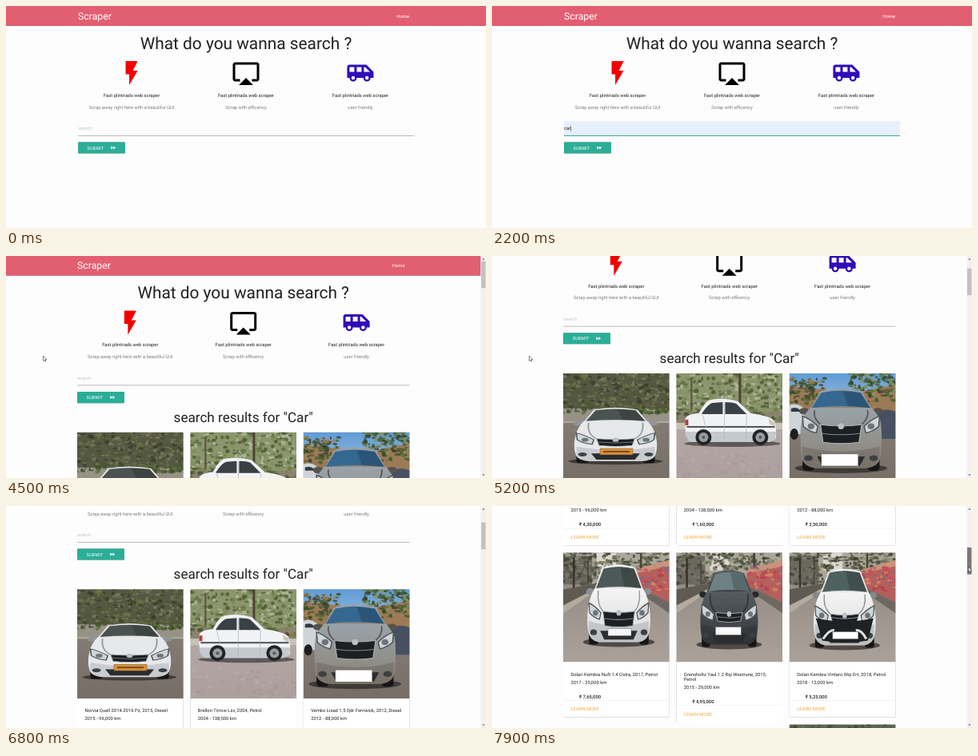
Recreate the animation shown at these times as an HTML page. Size 600 by 278 pixels, loop 8 s.

```html
<!DOCTYPE html>
<html lang="en">
<head>
<meta charset="utf-8">
<title>Scraper</title>
<style>
html, body { margin: 0; width: 100%; height: 100%; overflow: hidden; background: #fdfdfd; }
svg { display: block; }
text { font: 400 5.86px Roboto, sans-serif; fill: #212121; text-rendering: geometricPrecision; white-space: pre; }
.mid { text-anchor: middle; }
.light { font-weight: 300; fill: #444; }
.bold { font-weight: 500; }
.hint { fill: #c9c9c9; }
.white { fill: #fff; }
.link { fill: #f5a94a; }
.lift { filter: drop-shadow(0 .6px .6px rgba(0,0,0,.45)); }
</style>
</head>
<body>
<svg id="stage" width="600" height="278" viewBox="0 0 600 278"></svg>
<script>
const LOOP = 8000;
const $ = id => document.getElementById(id);

// markup helpers
const rect = (x, y, w, h, fill, more = '') => `<rect x="${x}" y="${y}" width="${w}" height="${h}" fill="${fill}" ${more}/>`;
const path = (d, fill, more = '') => `<path d="${d}" fill="${fill}" ${more}/>`;
const oval = (x, y, rx, ry, fill, more = '') => `<ellipse cx="${x}" cy="${y}" rx="${rx}" ry="${ry}" fill="${fill}" ${more}/>`;
const text = (x, y, s, cls = '', size = 5.86) => `<text x="${x}" y="${y}" class="${cls}" style="font-size:${size}px">${s}</text>`;
const place = (x, y, sx, sy, body) => `<g transform="translate(${x} ${y}) scale(${sx} ${sy})">${body}</g>`;
const fade = (id, a, b) => `<linearGradient id="${id}" x2="0" y2="1"><stop stop-color="${a}"/><stop offset="1" stop-color="${b}"/></linearGradient>`;

const icons = {
  bolt: 'M7 2v11h3v9l7-12h-4l4-8z',
  cast: 'M6 22h12l-6-6zM21 3H3c-1.1 0-2 .9-2 2v12c0 1.1.9 2 2 2h4v-2H3V5h18v12h-4v2h4c1.1 0 2-.9 2-2V5c0-1.1-.9-2-2-2z',
  van: 'M17 5H3c-1.1 0-2 .89-2 2v9h2a3 3 0 0 0 6 0h5.5a3 3 0 0 0 6 0H23v-5l-6-6zM3 11V7h4v4H3zM6 17.5a1.5 1.5 0 1 1 0-3 1.5 1.5 0 0 1 0 3zM13 11H9V7h4v4zM17.5 17.5a1.5 1.5 0 1 1 0-3 1.5 1.5 0 0 1 0 3zM15 11V7h1l4 4h-5z',
  next: 'M4 18l8.5-6L4 6v12zm9-12v12l8.5-6L13 6z'
};

// photo parts
function leaves(n, x, y, w, h, colors, seed) {
  let out = '';
  const rnd = () => (seed = seed * 16807 % 2147483647) / 2147483647;
  for (let i = 0; i < n; i++)
    out += oval((x + rnd() * w).toFixed(1), (y + rnd() * h).toFixed(1), (1 + rnd() * 2.8).toFixed(1), (.8 + rnd() * 1.8).toFixed(1), colors[i % colors.length], 'opacity=".8"');
  return out;
}

// sill: lower edge of the windscreen; top, low: extent of the grille (all in % of the height)
function frontCar(x, y, w, h, { body, shade, glass, sill, top, low, inner = 28, lamp = '#cfd6da' }) {
  const pair = s => s + `<g transform="matrix(-1 0 0 1 100 0)">${s}</g>`;
  return place(x, y, w / 100, h / 100,
    oval(50, 96, 54, 6, '#1f1e1e', 'opacity=".65"') +
    pair(rect(5, 74, 14, 25, '#161616', 'rx="4"') + oval(7, sill + 4, 6, 4, shade)) +
    path(`M25 5Q50-3 75 5L88 ${sill + 4}H12Z`, body) +
    path(`M14 ${sill}Q7 ${sill + 8} 4 ${top - 5}Q1 ${top + 12} 4 83Q6 94 20 96H80Q94 94 96 83Q99 ${top + 12} 96 ${top - 5}Q93 ${sill + 8} 86 ${sill}Z`, body) +
    path(`M27 6Q50 1 73 6L84 ${sill}Q50 ${sill - 4} 16 ${sill}Z`, glass) +
    path(`M52 4L73 6L84 ${sill}L58 ${sill - 2}Z`, '#000', 'opacity=".18"') +
    path(`M5 70Q50 82 95 70V83Q93 94 80 96H20Q7 94 5 83Z`, shade, 'opacity=".35"') +
    pair(path(`M19 ${sill + 3}Q17 ${top - 8} ${inner} ${top}`, 'none', `stroke="${shade}" stroke-width="1.6"`) +
      path(`M5 ${top - 10}Q14 ${top - 7} ${inner - 3} ${top + 2}L${inner - 5} ${top + 10}Q12 ${top + 8} 6 ${top + 2}Z`, lamp, 'stroke="#4b5054" stroke-width="1.4"') +
      oval(15, top + 2, 4, 3.5, '#6d757b') + oval(12, 84, 5, 3.5, '#3d4042')) +
    path(`M${inner} ${top}Q50 ${top + 3} ${100 - inner} ${top}L${97 - inner} ${low}Q50 ${low + 3} ${inner + 3} ${low}Z`, '#1d2022', 'stroke="#aeb3b6" stroke-width="1"') +
    path(`M${inner + 2} ${(top + low) / 2}Q50 ${(top + low) / 2 + 3} ${98 - inner} ${(top + low) / 2}`, 'none', 'stroke="#85898c" stroke-width="1"') +
    path('M22 82H78L72 93H28Z', '#2a2c2e') +
    oval(50, top + 2, 3.6, 3.6, '#b9bfc4'));
}

const plate = (x, y, w, h, fill) => rect(x, y, w, h, fill, 'stroke="#555" stroke-width=".4"');

const street = seed =>
  rect(0, 0, 133, 137, 'url(#road)') + rect(0, 0, 133, 40, '#aaa698') +
  rect(0, 4, 36, 36, '#6c6a60') + rect(42, 0, 24, 22, '#d9d8d0') +
  leaves(190, 0, -2, 133, 24, ['#4a5139', '#666b50', '#393c2e', '#908f7a'], seed) +
  leaves(60, 0, 18, 50, 22, ['#3f4036', '#5c5a4e', '#7b776b'], seed + 2) +
  rect(12, 6, 2.5, 42, '#38332b') + rect(30, 10, 1.6, 32, '#4b453c') + rect(96, 0, 2.5, 24, '#4a4138') +
  path('M88 22L133 9V62L88 41Z', '#b5605c') + path('M88 22L133 9V17L88 26Z', '#c9937a') +
  leaves(60, 92, 18, 40, 30, ['#c94a5d', '#d68a62', '#8d6a78', '#b1414c'], seed + 5) +
  path('M0 46L54 36L0 70Z', '#5f5a52') + path('M0 66L58 36L0 76Z', '#b3aaa0') +
  path('M88 41L133 62V76L88 45Z', '#6f6862');

const photos = [
  () => rect(0, 0, 133, 137, 'url(#lane)') + rect(0, 0, 133, 48, '#565843') +
    leaves(260, 0, 0, 133, 42, ['#4c5634', '#697043', '#363d28', '#7c7c60'], 11) +
    rect(0, 44, 133, 16, '#979286') + leaves(90, 0, 42, 133, 8, ['#485a2e', '#5d6f3c', '#3b4728'], 7) +
    rect(0, 60, 133, 2, '#b3aca1') +
    frontCar(11, 42, 109, 71, { body: '#e6e8ea', shade: '#8f959a', glass: '#4a5350', sill: 25, top: 56, low: 68 }) +
    plate(46, 94, 41, 8, '#d98f35') + rect(50, 97, 33, 2, '#7a4c1c'),

  () => rect(0, 0, 133, 137, 'url(#yard)') + rect(0, 0, 133, 60, '#8c956d') +
    leaves(260, 0, 0, 133, 46, ['#5d7040', '#7f8f58', '#46562f', '#b7bd9d'], 31) +
    rect(78, 0, 3, 60, '#4d4335') + rect(18, 6, 2, 50, '#5b503f') +
    rect(0, 48, 133, 14, '#8b8270') + leaves(70, 0, 45, 133, 14, ['#55683a', '#73814d', '#46502f'], 19) +
    rect(0, 62, 133, 8, '#c9c1b8') + leaves(50, 0, 98, 133, 38, ['#b7aaa8', '#a59896'], 23) +
    oval(70, 88, 60, 4, '#3c3838', 'opacity=".7"') +
    path('M11 58Q12 51 28 50Q36 35 43 33Q61 30 77 35L93 50Q117 53 123 60Q126 74 124 82L116 86H18Q10 82 11 58Z', '#f1f2f4') +
    path('M32 50Q39 39 45 37L58 36V51H32ZM61 36Q71 36 75 38L88 51H61Z', '#394146') +
    path('M11 73H125L123 83L116 86H18Q12 83 11 73Z', '#c4c9cd') +
    rect(13, 66, 110, 2, '#4e5255') + path('M60 37V83M88 52L87 82M33 52L37 68', 'none', 'stroke="#aab0b4" stroke-width=".7"') +
    rect(11, 58, 4, 7, '#a84440') + path('M115 57L123 61V66L117 64Z', '#d0c6b4') +
    [34, 105].map(x => oval(x, 80, 10, 10, '#222325') + oval(x, 80, 6, 6, '#9a9ea1') + oval(x, 80, 2, 2, '#55585b')).join(''),

  () => rect(0, 0, 133, 137, 'url(#lane)') + rect(0, 0, 133, 62, 'url(#sky)') +
    path('M0 16L40 20V60H0ZM92 22L133 14V60H92Z', '#9c7a55') +
    leaves(150, 76, 0, 57, 36, ['#42592f', '#5d7440', '#2f4026', '#86956c'], 43) +
    leaves(130, 0, 6, 44, 36, ['#4b5f35', '#34442a', '#9b8052'], 29) +
    path('M0 40Q10 36 18 44L20 76H0Z', '#cfd4d8') + path('M2 44Q10 41 15 48H2Z', '#333b41') +
    path('M106 50Q122 42 133 48V82H108Z', '#465060') + oval(6, 76, 5, 7, '#1d1d1d') +
    frontCar(11, 18, 107, 105, { body: 'url(#silver)', shade: '#57534d', glass: '#356890', sill: 24, top: 44, low: 65, inner: 26 }) +
    plate(40, 101, 46, 15, '#fff'),

  () => street(17) + frontCar(28, 14, 83, 102, { body: 'url(#pearl)', shade: '#8c9194', glass: '#4c5957', sill: 30, top: 58, low: 76, inner: 26 }) +
    plate(56, 95, 29, 9, '#f5f5f5'),

  () => street(53) + frontCar(28, 21, 76, 98, { body: 'url(#slate)', shade: '#25282b', glass: '#6c8183', sill: 28, top: 55, low: 66 }) +
    plate(49, 93, 32, 10, '#fafafa'),

  () => street(71) + frontCar(28, 19, 82, 101, { body: 'url(#pearl)', shade: '#85898b', glass: '#4f615f', sill: 30, top: 57, low: 66 }) +
    path('M33 82Q70 90 105 82L98 110Q70 115 41 110Z', '#1f2123') + path('M42 108Q50 96 56 97M83 97Q90 96 96 108', 'none', 'stroke="#e2e2e2" stroke-width="3"') +
    plate(54, 99, 32, 9, '#fff'),

  () => rect(0, 0, 133, 137, '#5b6154') + leaves(90, 0, 0, 133, 20, ['#39452f', '#66775a', '#4b5644'], 37)
];

const defs = `<defs>${fade('road', '#8b857e', '#aaa19a')}${fade('lane', '#8f877e', '#766e66')}${fade('yard', '#b9b0ad', '#ab9f9d')}` +
  `${fade('sky', '#5f9ad6', '#b8cfe2')}${fade('silver', '#9aa3aa', '#8a8174')}${fade('pearl', '#f4f4f3', '#d9dadb')}${fade('slate', '#565c61', '#34373b')}` +
  `<filter id="soft"><feGaussianBlur stdDeviation=".45"/></filter><clipPath id="btn">${rect(90, 170.5, 59, 14.1, '#000')}</clipPath></defs>`;

const ads = [
  [['Norvia Quell 2014-2016 Pz, 2015, Diesel'], '2015 - 96,000 km', '4,30,000'],
  [['Brellon Tirrow Lsv, 2004, Petrol'], '2004 - 138,500 km', '1,60,000'],
  [['Vemko Lisad 1.5 Qdr Fernwick, 2012, Diesel'], '2012 - 88,000 km', '3,50,000'],
  [['Dolari Kembra Nuft 1.4 Ostra, 2017, Petrol'], '2017 - 35,000 km', '7,65,000'],
  [['Grensholtz Yaul 1.2 Rqi Westrune, 2015,', 'Petrol'], '2015 - 29,000 km', '4,95,000'],
  [['Dolari Kembra Vintaro Wqi Ert, 2018, Petrol'], '2018 - 12,000 km', '5,25,000'],
  [['Dolari Kembra Nuft 1.3 Ostra, 2016, Diesel'], '2016 - 41,000 km', '6,10,000']
];

function card(i, x, y, w) {
  const [title, use, price] = ads[i];
  const d = (title.length - 1) * 6.4;
  return rect(x, y, w, 206 + d, '#fff', 'class="lift" rx=".8"') +
    `<svg class="photo" x="${x}" y="${y}" width="${w}" height="137" viewBox="0 0 132.6 137" preserveAspectRatio="none"><g filter="url(#soft)">${photos[i]()}</g></svg>` +
    title.map((s, k) => text(x + 9.4, y + 154.2 + k * 6.4, s)).join('') +
    text(x + 9.4, y + 164 + d, use) + text(x + 20, y + 182.2 + d, '₹ ' + price, 'bold') +
    rect(x, y + 184.6 + d, w, .4, '#e2e2e2') + text(x + 9.4, y + 197.6 + d, 'LEARN MORE', 'link');
}

function page(w) {
  const left = w * .15, right = w * .85, mid = w / 2, step = (w * .7 + 8.79) / 3;
  const cols = [
    ['bolt', '#f50000', 'Scrap away right here with a beautiful GUI'],
    ['cast', '#000', 'Scrap with efficency'],
    ['van', '#300bb8', 'user friendly']
  ];
  return rect(0, 0, w, 25, '#e25f71', 'class="lift"') +
    text(left, 16.8, 'Scraper', 'white', 12.3) +
    `<g text-anchor="end">${text(right - 5.86, 14.6, 'Home', 'white')}</g>` +
    text(mid, 53.7, 'What do you wanna search ?', 'mid', 20.86) +
    cols.map(([icon, color, note], i) => {
      const x = mid + (i - 1) * step;
      return place(x - 18, 66, 1.5, 1.5, path(icons[icon], color)) +
        text(x, 113.8, 'Fast plintriads web scraper', 'mid') + text(x, 128.6, note, 'mid light');
    }).join('') +
    text(left, 155.4, 'search', 'hint') + rect(left, 162, w * .7, .6, '#8e8e8e') +
    rect(left, 170.5, 59, 14.1, '#2bae97', 'class="lift" rx=".8"') +
    `<g letter-spacing=".2">${text(left + 11.6, 179.6, 'SUBMIT', 'white', 5.47)}</g>` +
    place(left + 40, 173.5, .33, .33, path(icons.next, '#fff'));
}

const W = 593.4, LEFT = W * .15, COL = (W * .7 + 8.79) / 3;
const tops = [221.2, 436.5, 651.5];
const cards = ads.map((_, i) => {
  const col = i === 6 ? 2 : i % 3;
  return card(i, LEFT + col * COL, tops[Math.floor(i / 3)], COL - 8.79);
}).join('');

$('stage').innerHTML = defs +
  rect(0, 0, 600, 278, '#fdfdfd') +
  `<g id="form">${page(600)}
    ${rect(90, 144.3, 420, 17.7, '#e8f0fe', 'id="fill"')}
    ${rect(90, 162, 420, .9, '#26a69a', 'id="line"')}
    <text id="typed" x="90" y="155.4"></text>${rect(98.6, 150.2, .5, 6.8, '#111', 'id="caret"')}
    <g clip-path="url(#btn)"><circle id="ripple" cx="145" cy="181" fill="#fff"/></g></g>
  <g id="results"><g id="scroll">${page(W)}${text(W / 2, 208.2, 'search results for "Car"', 'mid', 17.1)}${cards}</g>
    ${rect(W, 0, 6.6, 278, '#f1f1f1')}${path('M595.3 4.4h3l-1.5-1.7z', '#555')}${path('M595.3 273.6h3l-1.5 1.7z', '#555')}
    ${rect(W + .6, 6.6, 5.4, 33.6, '#c1c1c1', 'id="thumb"')}</g>
  <path id="mouse" d="M0 0V6.3L1.5 5L2.5 7.2L3.5 6.8L2.5 4.6H4.5Z" fill="#fff" stroke="#222" stroke-width=".55"/>`;

const hint = document.querySelector('#form .hint');
const shots = document.querySelectorAll('.photo');
const clamp = p => Math.max(0, Math.min(1, p));
const span = (t, a, b) => clamp((t - a) / (b - a));
const smooth = p => p * p * (3 - 2 * p);
const show = (el, on) => el.style.visibility = on ? 'inherit' : 'hidden';

// wheel notches: start time and direction
const wheel = [[4500, 1], [5063, 1], [5350, 1], [5650, -1], [5933, -1], [6250, 1], [6500, 1]];
const scrollAt = t => wheel.reduce((s, [at, dir]) => s + dir * 39 * (1 - (1 - span(t, at, at + 200)) ** 2), 0)
  + 261 * span(t, 7180, 7900);

// pointer moves: start, end, from, to
const moves = [
  [950, 1350, [8, 178], [150, 152]],
  [2400, 3000, [150, 152], [145, 181]],
  [3420, 3600, [145, 181], [46.5, 125]],
  [6500, 6780, [46.5, 125], [604, 58]],
  [6900, 7150, [604, 58], [595.5, 45]]
];
function pointer(t) {
  const [a, b, from, to] = moves.filter(m => t >= m[0]).pop() || moves[0];
  const p = smooth(span(t, a, b));
  return from.map((v, i) => v + (to[i] - v) * p);
}

function draw(t) {
  const done = t >= 3800;
  show($('form'), !done);
  show($('results'), done);

  const n = [1500, 1600, 1800].filter(at => t >= at).length;
  $('typed').textContent = 'car'.slice(0, n);
  show(hint, n === 0);
  show($('fill'), t >= 1900);
  $('line').style.opacity = span(t, 1380, 1600) * (1 - span(t, 3250, 3350));
  const since = t < 1900 ? 0 : t - 1900;
  show($('caret'), t >= 1400 && t < 3280 && since % 1000 < 500);
  $('caret').setAttribute('x', 90.2 + [0, 3.1, 6.2, 8.2][n]);
  const r = span(t, 3260, 3700);
  $('ripple').setAttribute('r', 50 * r);
  $('ripple').style.opacity = r > 0 ? .35 * (1 - r) : 0;

  const s = scrollAt(t);
  $('scroll').setAttribute('transform', `translate(0 ${-s})`);
  $('thumb').setAttribute('y', 6.6 + s * .12);
  $('thumb').setAttribute('fill', t >= 7180 ? '#787878' : '#c1c1c1');
  shots.forEach((el, i) => show(el, t >= 3900 + (i % 3) * 150));

  const [x, y] = pointer(t);
  const drag = 31.3 * span(t, 7180, 7900);
  show($('mouse'), t >= 1000 && (t < 1480 || t >= 2400));
  $('mouse').setAttribute('transform', `translate(${x} ${y + drag})`);
}

function tick() {
  draw(performance.now() % LOOP);
  requestAnimationFrame(tick);
}
tick();
</script>
</body>
</html>
```
